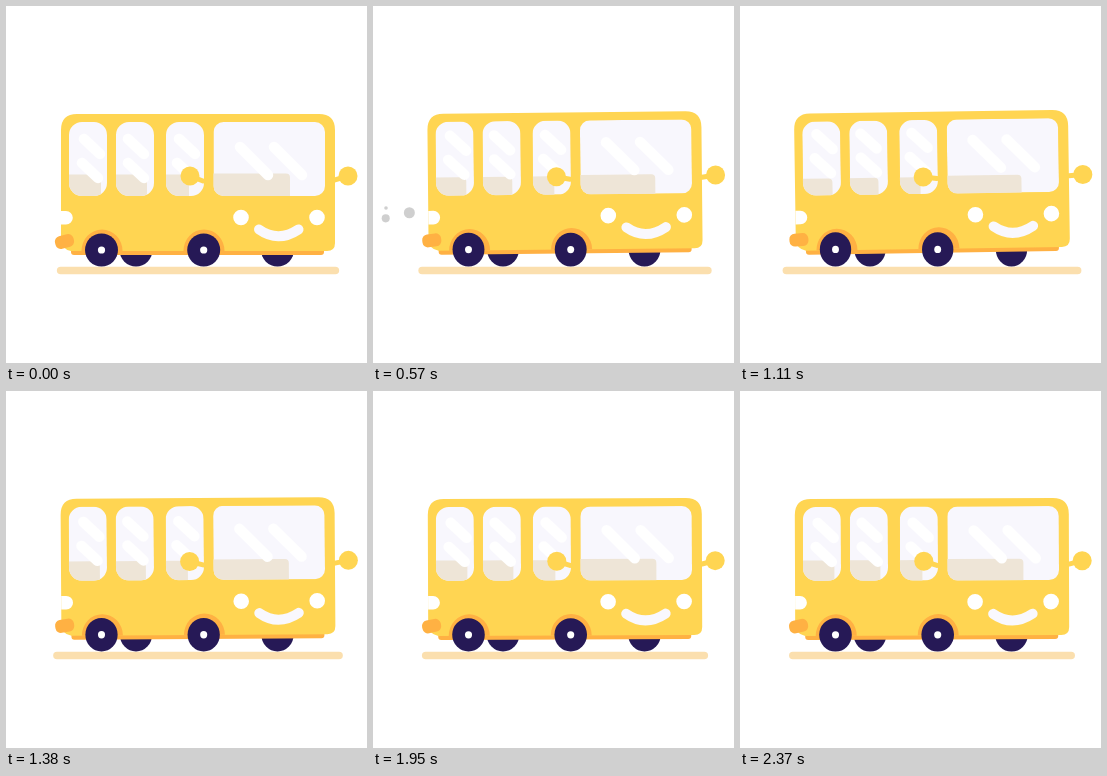
Recreate the animation shown at these times as an HTML page. Size 361 by 357 pixels, loop 2.4 s.

```html
<!DOCTYPE html>
<html lang="en">
<head>
<meta charset="utf-8">
<style>
html, body { margin: 0; width: 100%; height: 100%; overflow: hidden; background: #fff; }
svg { display: block; width: 361px; height: 357px; }
</style>
</head>
<body>
<svg viewBox="0 0 361 357">
  <g id="puffs" fill="#cfcfcf"></g>
  <line id="ground" y1="264.5" y2="264.5" stroke="#fbdfae" stroke-width="7.5" stroke-linecap="round"/>
  <g id="farWheels" fill="#261956"></g>
  <g id="bus">
    <path d="M65 243H318V246Q318 249 315 249H68Q65 249 65 246Z" fill="#ffb143"/>
    <path d="M71 108H313Q329 108 329 124V237Q329 245 321 245H65Q55 243 55 233V124Q55 108 71 108Z" fill="#ffd552"/>
    <path d="M75.5 245a20.5 21.5 0 0 1 41 0zM177.5 245a20.5 21.5 0 0 1 41 0z" fill="#ffb143"/>
    <g id="windows"></g>
    <path d="M55 205h5a6.8 6.8 0 0 1 0 13.6h-5z" fill="#fff"/>
    <g fill="#fff">
      <circle cx="235" cy="211.5" r="7.8"/>
      <circle cx="311" cy="211.5" r="7.8"/>
    </g>
    <path d="M253 223.5Q272 237 292.500 223.500" fill="none" stroke="#f9f8fd" stroke-width="10" stroke-linecap="round"/>
  </g>
  <rect id="exhaust" x="-9.500" y="-6.500" width="19" height="13" rx="5.500" fill="#ffb143"/>
  <g id="nearWheels" fill="#261956"></g>
  <g id="mirrors" stroke="#ffd552" stroke-linecap="round"></g>
</svg>
<script>
const LOOP = 2400, BOUNCE = 480;
const $ = id => document.getElementById(id);
const mix = (a, b, k) => a + (b - a) * k;

// x, width, seat right edge, glare strokes
const panes = [
  [63, 38, 95, 'M78 133l16 15M76 157l16 15'],
  [110, 38, 141, 'M122 133l16 15M122 157l16 15'],
  [160, 38, 183, 'M173 133l16 15M171 157l16 15'],
  [207.500, 111.500, 284, 'M234 141l28 28M268 141l28 28']
];
$('windows').innerHTML = panes.map(([x, w, right, glare], i) => `
  <clipPath id="pane${i}"><rect x="${x}" y="116" width="${w}" height="74" rx="${i < 3 ? 13 : 10}"/></clipPath>
  <g clip-path="url(#pane${i})">
    <rect x="${x}" y="116" width="${w}" height="74" fill="#f8f7fd"/>
    <rect class="seat" x="${x - 30}" y="${i < 3 ? 168.500 : 167.500}" width="${right - x + 30}" height="50" rx="4" fill="#eee5d7"/>
    <path class="glare" d="${glare}" fill="none" stroke="#fff" stroke-width="10.500" stroke-linecap="round"/>
  </g>`).join('');

const wheel = (x, hub) => `<g class="wheel" data-x="${x}"><circle cy="-16.500" r="16.500"/>${
  hub ? '<circle cy="-16.500" r="3.600" fill="#fff"/>' : ''}</g>`;
$('farWheels').innerHTML = wheel(130) + wheel(271.500);
$('nearWheels').innerHTML = wheel(95.500, true) + wheel(197.700, true);

// start time, travel x, travel y
const puffs = [[120, -45, -20], [240, -47, -10], [440, -44, -31]];

function drawPuff([start, dx, dy], time) {
  const age = time - start;
  if (age <= 0 || age >= 550) return '';
  const k = Math.sin(Math.min(1, age / 400) * Math.PI / 2);
  const r = 5.5 * Math.min(1, age / 40, (550 - age) / 300);
  return `<circle cx="${58 + dx * k}" cy="${222 + dy * k}" r="${r}"/>`;
}

function drawMirror(joint, rest, lifted, k) {
  const x = mix(rest[0], lifted[0], k), y = mix(rest[1], lifted[1], k);
  const jy = mix(joint[1], joint[2], k);
  return `<path d="M${x} ${y}L${joint[0]} ${jy}" stroke-width="5"/>
    <circle cx="${x}" cy="${y}" r="9.500" fill="#ffd552" stroke="none"/>`;
}

const setAll = (selector, transform) => document.querySelectorAll(selector)
  .forEach(el => el.setAttribute('transform', transform(el)));

function draw(now) {
  const time = now % LOOP;
  const lift = Math.abs(Math.sin(Math.PI * time / BOUNCE));
  $('ground').setAttribute('x1', 54.7 - 10 * lift);
  $('ground').setAttribute('x2', 329.3 + 10 * lift);
  $('bus').setAttribute('transform', `translate(0 ${-0.3 * lift}) rotate(${-lift} 60 180)`);
  setAll('.seat', () => `translate(${-3 * lift} ${5.5 * lift})`);
  setAll('.glare', () => `translate(${-lift} ${-5 * lift})`);
  setAll('.wheel', el => `translate(${el.dataset.x} 260.500) scale(${1 - 0.06 * lift} ${1 + 0.045 * lift})`);
  $('exhaust').setAttribute('transform',
    `translate(${mix(58.500, 59, lift)} ${mix(235.500, 233.500, lift)}) rotate(${mix(-15, -2, lift)})`);
  $('mirrors').innerHTML =
    drawMirror([197, 175, 172], [184, 170], [183, 171.300], lift) +
    drawMirror([329, 174, 169], [342, 170], [343, 168.300], lift);
  $('puffs').innerHTML = puffs.map(p => drawPuff(p, time)).join('');
}

const began = performance.now();
function tick() {
  draw(performance.now() - began);
  requestAnimationFrame(tick);
}
tick();
</script>
</body>
</html>
```
